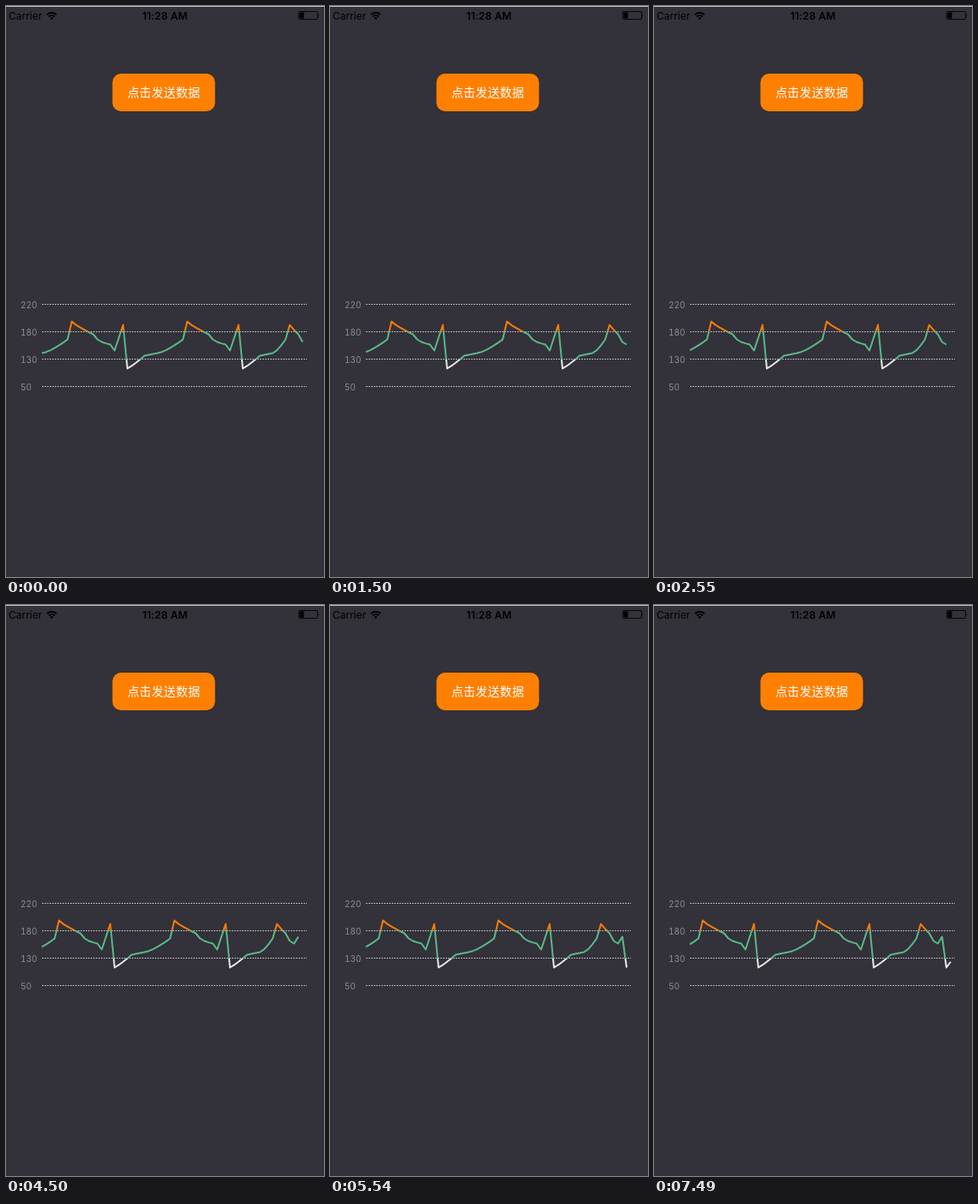
Write an HTML page that moves like this. It is 372 px wide and 667 px high and loops after 8000 ms.

```html
<!DOCTYPE html>
<html lang="zh-CN">
<head>
<meta charset="utf-8">
<title>Live line chart</title>
<style>
  html, body { margin: 0; width: 100%; height: 100%; overflow: hidden; background: #333139; }
  svg { display: block; width: 100%; height: 100%; }
  text { font-family: Inter, "Noto Sans CJK SC", "Noto Sans CJK", sans-serif; }
  #grid { font-size: 10px; font-variant-numeric: tabular-nums; }
</style>
</head>
<body>
<svg viewBox="0 0 372 667">
  <defs>
    <linearGradient id="zones" gradientUnits="userSpaceOnUse" x1="0" y1="348.5" x2="0" y2="444.5">
      <stop offset="33.333%" stop-color="#f57c08"/>
      <stop offset="33.333%" stop-color="#59b888"/>
      <stop offset="66.667%" stop-color="#59b888"/>
      <stop offset="66.667%" stop-color="#e8e8e8"/>
    </linearGradient>
  </defs>
  <rect width="372" height="667" fill="#333139"/>
  <rect width="372" height="1" fill="#c4c3c6"/>

  <g font-size="12">
    <text x="3" y="16">Carrier</text>
    <text x="186" y="16" text-anchor="middle" font-weight="600" letter-spacing=".15">11:28 AM</text>
  </g>
  <g fill="none" stroke="#000" stroke-width="1.9">
    <path d="M47.9 10.1a8 8 0 0 1 11.2 0M50 12.4a5 5 0 0 1 7 0"/>
    <path d="M53.5 16l-2-2.1a2.9 2.9 0 0 1 4 0z" fill="#000" stroke="none"/>
  </g>
  <rect x="342.5" y="6.5" width="22" height="9" rx="1.5" fill="none" stroke="#000" stroke-opacity=".85"/>
  <path d="M343.5 7.5h5v7h-5zM365.5 9.5q1.5 1.5 0 3z"/>

  <rect x="124.5" y="79" width="120" height="44" rx="10" fill="#ff8000"/>
  <text x="184.5" y="106" font-size="14" letter-spacing=".2" text-anchor="middle" fill="#fff">点击发送数据</text>

  <g id="grid" fill="#8f8d92"></g>
  <path id="line" fill="none" stroke="url(#zones)" stroke-width="2" stroke-linejoin="round"/>
</svg>
<script>
  const LOOP = 8000, LEFT = 42, STEP = 5, WINDOW = 62, PERIOD = 27, CYCLES = 2;
  // The chart alternately scrolls one step and receives one new point.
  const changes = [450, 1500, 2550, 3450, 4500, 5540, 6440, 7490];

  // Turning points of one cycle: index, height, easing power of the way there.
  const keys = [
    [0, 405.5], [6, 389.5, 1.4], [7, 368.5], [12, 383.5, 0.8], [13, 389.5],
    [16, 395.5, 0.63], [17, 402.5], [19, 372.5], [20, 423.5], [24, 408.5, 1.15], [PERIOD, 405.5]
  ];

  function wave(i) {
    const n = keys.findIndex(([at]) => at > i);
    const [from, y0] = keys[n - 1], [to, y1, power = 1] = keys[n];
    return y0 + (y1 - y0) * ((i - from) / (to - from)) ** power;
  }

  // After the first cycles the data runs at double speed.
  function height(k) {
    const extra = Math.max(0, k - PERIOD * CYCLES);
    return wave((k + extra) % PERIOD);
  }

  document.getElementById('grid').innerHTML = [220, 180, 130, 50].map((label, i) => {
    const y = 348.5 + 32 * i;
    return `<text x="17" y="${y + 4}">${label}</text>` +
      `<path d="M${LEFT} ${y}H352" stroke="#b0afb1" stroke-dasharray="2 1"/>`;
  }).join('');

  const line = document.getElementById('line');

  function draw(time) {
    const done = changes.filter(at => at <= time).length;
    const first = Math.ceil(done / 2), count = WINDOW - done % 2;
    const coords = Array.from({ length: count }, (_, i) => `${LEFT + STEP * i} ${height(first + i)}`);
    line.setAttribute('d', 'M' + coords.join('L'));
  }

  const begin = performance.now();
  function tick() {
    draw((performance.now() - begin) % LOOP);
    requestAnimationFrame(tick);
  }
  tick();
</script>
</body>
</html>
```
